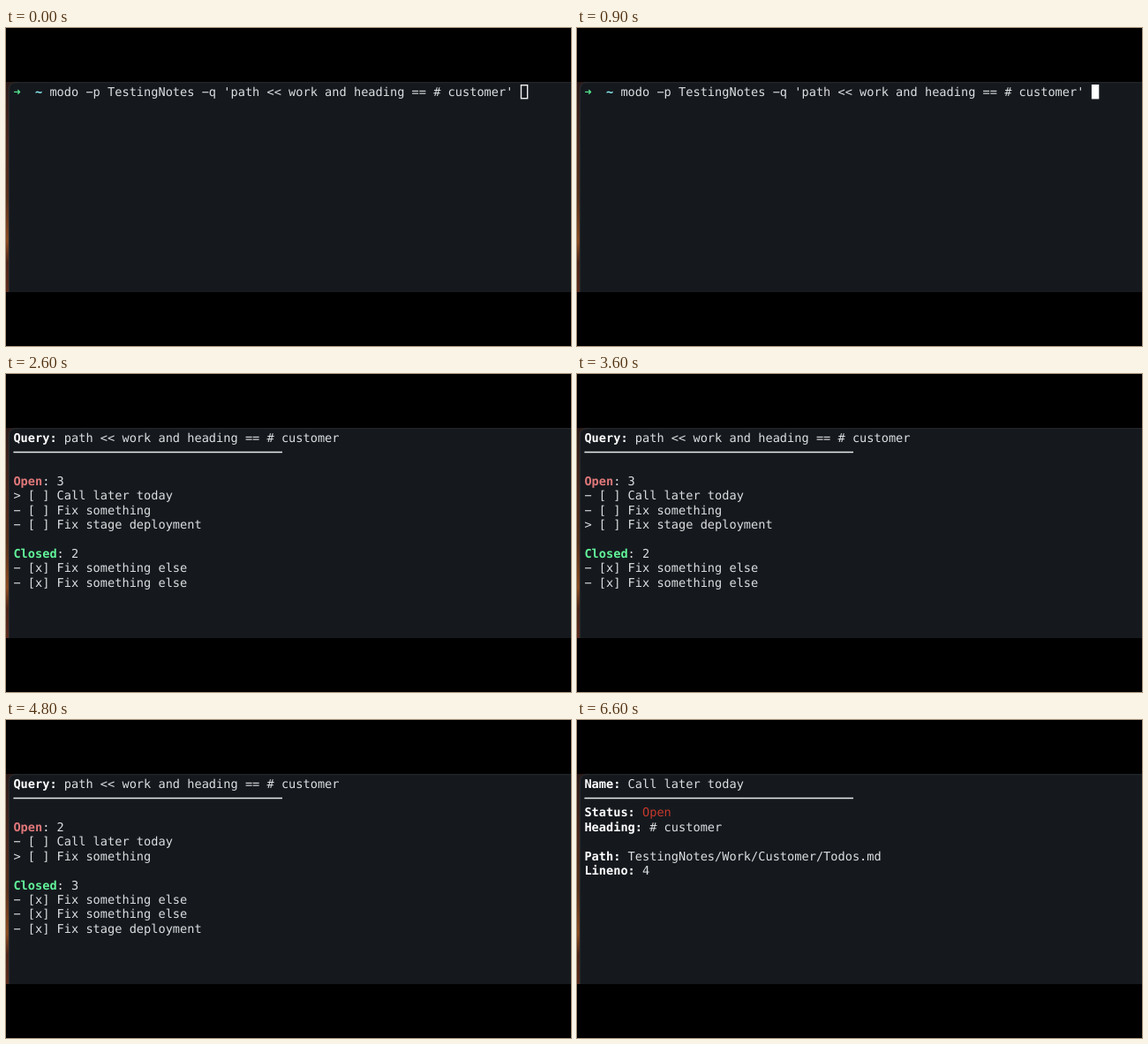
These frames come from a looping animation (640 by 360 pixels, 8 s). An HTML page:

```html
<!DOCTYPE html>
<html lang="en">
<head>
<meta charset="utf-8">
<title>Terminal task query</title>
<style>
  html, body { margin: 0; width: 100%; height: 100%; overflow: hidden; background: #000; }
  svg { display: block; width: 640px; height: 360px; }
  text {
    font: 13.63px "DejaVu Sans Mono", monospace;
    fill: #dcdee0;
    white-space: pre;
    text-rendering: geometricPrecision;
  }
  .bold { font-weight: bold; fill: #fff; }
  .arrow { font-weight: bold; fill: #56e890; }
  .tilde { font-weight: bold; fill: #8ceef4; }
  .open { font-weight: bold; fill: #e0787a; }
  .closed { font-weight: bold; fill: #62f49a; }
  .red { fill: #c5392c; }
  .rule { stroke: #e8e9ea; stroke-width: 1.5; }
  .cursor { fill: #fff; }
  .cursor.hollow { fill: none; stroke: #f2f2f2; stroke-width: 1.4; }
  .screen { visibility: hidden; animation: 8s step-end infinite; }
</style>
</head>
<body>
<svg viewBox="0 0 640 360">
  <defs>
    <linearGradient id="wall" x2="0" y2="1">
      <stop offset="0" stop-color="#2a1a18"/>
      <stop offset=".3" stop-color="#4a271c"/>
      <stop offset=".55" stop-color="#57301c"/>
      <stop offset=".76" stop-color="#8a4a20"/>
      <stop offset=".86" stop-color="#4c2418"/>
      <stop offset="1" stop-color="#5a2a1c"/>
    </linearGradient>
  </defs>
  <rect width="640" height="360"/>
  <rect y="61" width="14" height="238" fill="url(#wall)"/>
  <path d="M3 299V70Q3 61.5 11 61.5H640V299Z" fill="#15191e"/>
  <path d="M3.3 299V70Q3.3 61.7 11 61.7H640" fill="none" stroke="#34383c" stroke-width=".7"/>
  <g id="screens"></g>
</svg>
<script>
  const LOOP = 8000, LEFT = 8.4, COL = 8.207, TOP = 76.6, ROW = 16.43;

  // A line is a list of [text, class] parts, set one after another.
  const line = (row, ...parts) => {
    const spans = parts.map(([text, cls = '']) =>
      `<tspan class="${cls}">${text.replace(/</g, '&lt;').replace(/-/g, '\u2212')}</tspan>`);
    return `<text x="${LEFT}" y="${TOP + row * ROW}">${spans.join('')}</text>`;
  };
  const rule = '<path class="rule" d="M8.4 88.6H313"/>';

  const prompt = hollow => {
    const x = LEFT + 70 * COL;
    const box = hollow
      ? `<rect class="cursor hollow" x="${x + .6}" y="64.7" width="7.2" height="15"/>`
      : `<rect class="cursor" x="${x}" y="64" width="8.4" height="16.4"/>`;
    return line(0, ['➜', 'arrow'], ['  '], ['~', 'tilde'],
      [" modo -p TestingNotes -q 'path << work and heading == # customer'"]) + box;
  };

  const list = (open, closed, selected) => {
    const task = (name, i, mark) => [`${i === selected ? '>' : '-'} [${mark}] ${name}`];
    const closedRow = open.length + 5;
    return line(0, ['Query:', 'bold'], [' path << work and heading == # customer']) + rule +
      line(3, ['Open', 'open'], [`: ${open.length}`]) +
      open.map((name, i) => line(4 + i, task(name, i, ' '))).join('') +
      line(closedRow, ['Closed', 'closed'], [`: ${closed.length}`]) +
      closed.map((name, i) =>
        line(closedRow + 1 + i, task(name, open.length + i, 'x'))).join('');
  };

  const field = (row, label, value, cls) => line(row, [label + ':', 'bold'], [' '], [value, cls]);
  const details = field(0, 'Name', 'Call later today') + rule +
    field(2, 'Status', 'Open', 'red') +
    field(3, 'Heading', '# customer') +
    field(5, 'Path', 'TestingNotes/Work/Customer/Todos.md') +
    field(6, 'Lineno', '4');

  const todo = ['Call later today', 'Fix something'], stage = 'Fix stage deployment';
  const done = ['Fix something else', 'Fix something else'];
  const before = selected => list([...todo, stage], done, selected);
  const after = selected => list(todo, [...done, stage], selected);

  const screens = [
    [0, prompt(true)],
    [900, prompt(false)],
    [1700, before(0)],
    [2900, before(1)],
    [3600, before(2)],
    [4100, after(2)],
    [4500, after(1)],
    [5400, after(0)],
    [6600, details]
  ];

  const percent = ms => ms / LOOP * 100 + '%';
  const style = document.createElement('style');
  style.textContent = screens.map(([start], i) => {
    const end = i + 1 < screens.length ? screens[i + 1][0] : LOOP;
    const before = start ? '0% { visibility: hidden }' : '';
    return `@keyframes screen${i} { ${before}
      ${percent(start)} { visibility: visible }
      ${percent(end)} { visibility: hidden } }`;
  }).join('\n');
  document.head.append(style);
  document.getElementById('screens').innerHTML = screens.map(([, content], i) =>
    `<g class="screen" style="animation-name: screen${i}">${content}</g>`).join('');
</script>
</body>
</html>
```
